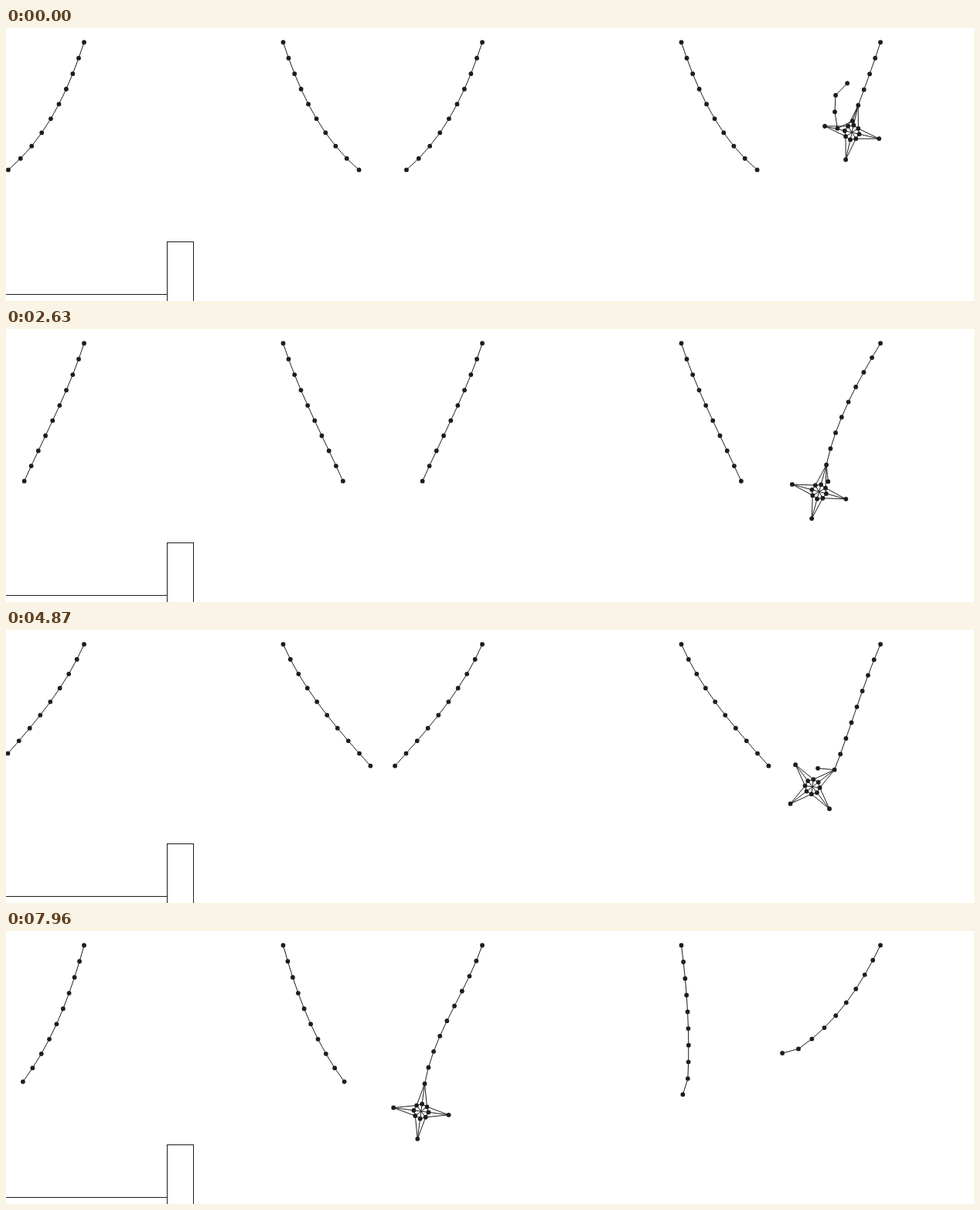
Recreate the animation shown at these times as an HTML page. Size 1252 by 353 pixels, loop 8000 ms.

```html
<!DOCTYPE html>
<html lang="en">
<head>
<meta charset="utf-8">
<title>Swinging star</title>
<style>
  html, body { margin: 0; width: 100%; height: 100%; overflow: hidden; background: #fff; }
  svg { display: block; }
  path { fill: none; stroke: #1f1c1d; }
</style>
</head>
<body>
<svg width="1252" height="353" viewBox="0 0 1252 353">
  <path d="M0 344.5H208.5M208.5 354V276.5H242.5V354" shape-rendering="crispEdges"/>
  <path id="lines" stroke-width="1"/>
  <path id="dots" stroke-width="5.8" stroke-linecap="round"/>
</svg>
<script>
const LOOP = 8, LINKS = 9, LINK = 21.6, ARM = 36, HUB = 9.6, TOP = 18.5;
const range = n => Array.from({ length: n }, (_, i) => i);
const anchors = range(5).map(i => 101 + 257.5 * i);
const rad = deg => deg * Math.PI / 180;
const lerp = (a, b, u) => a + (b - a) * u;
const clamp01 = u => Math.min(1, Math.max(0, u));

// Smooth curve through keys [time, ...values].
function sample(keys, t) {
  const last = keys.length - 1;
  let k = 0;
  while (k < last - 1 && t > keys[k + 1][0]) k++;
  const a = keys[k], b = keys[k + 1];
  const before = keys[Math.max(0, k - 1)], after = keys[Math.min(last, k + 2)];
  const span = b[0] - a[0], u = clamp01((t - a[0]) / span);
  const u2 = u * u, u3 = u2 * u;
  return a.slice(1).map((v, j) => {
    const i = j + 1;
    const m0 = (b[i] - before[i]) / (b[0] - before[0]) * span;
    const m1 = (after[i] - v) / (after[0] - a[0]) * span;
    return (2 * u3 - 3 * u2 + 1) * v + (u3 - 2 * u2 + u) * m0
      + (3 * u2 - 2 * u3) * b[i] + (u3 - u2) * m1;
  });
}

// A rope bends along a parabola of link angles; only the last link is free.
function bend(root, mid, end, i) {
  const u = i / 3.5, curve = (end - 2 * mid + root) / 2;
  return root + (mid - root - curve) * u + curve * u * u;
}
const rope = keys => keys.map(([t, root, mid, end, tail = bend(root, mid, end, 8)]) =>
  [t, root, mid, end, tail]);

// Keys: time, angles at root, middle and end, optional tail; right is positive.
const idle = rope([
  [0, -19, -27.5, -42],
  [1.92, -12, -18, -32],
  [3.31, 17.5, 24, 34.5],
  [4.87, -25.5, -36, -41.2],
  [6, 17.5, 24, 36],
  [7.1, -7, -10, -15.2],
  [7.96, -16, -22, -31.7],
  ...range(6).flatMap(i => {
    const side = i % 2 ? -1 : 1;
    return [
      [0.34 + 1.326 * i, -2 * side, 0, 4 * side],
      [1.01 + 1.325 * i, 27 * side, 37 * side, 42 * side]
    ];
  })
].sort((a, b) => a[0] - b[0]));

const rightRope = rope([
  [0, -18.4, -20.3, -18],
  [1, 33, 38, 38],
  [1.6, -4, 0, 3, 60],
  [1.92, -38, -28, -32, 116.6],
  [2.3, -38, -36, -32, 20],
  [3.31, -8, 6.5, 28, 13],
  [3.75, 28, 36, 42],
  [4.12, 20, 22, 26],
  [4.87, -22.5, -19, -20.5, -95],
  [5.3, -32, -36, -40],
  [6, 6.5, 3, -5.4, 6.7],
  [6.62, 30, 38, 44],
  [7.1, 12, 19.5, 17],
  [7.96, -27, -37, -53.5, -75]
]);
const fourthRope = rope([
  [5.5, 2, 0, -6],
  [6, -29, -32, -36.6, -95],
  [6.25, -32, -33, -36],
  [7.1, 25, 26, 33, 58],
  [7.32, 27, 31, 40],
  [7.96, 7, 3, -2, -17.5]
]);
const middleRope = rope([
  [6.6, 2, 0, -3],
  [7.1, -22, -23.5, -33, -32],
  [7.5, -31, -34, -31],
  [7.96, -21, -27, -18, -13]
]);

const idlePose = (index, t) => sample(idle, t).map(v => index % 2 ? -v : v);
const afterGrab = (index, grab, keys) => ({
  grab, keys: [[grab, ...idlePose(index, grab)], ...keys]
});
const driven = {
  2: afterGrab(2, 6.1, middleRope),
  3: afterGrab(3, 5, fourthRope),
  4: { grab: 0, keys: rightRope }
};
const coil = { 5: -44, 6: -152, 7: -165, 8: -208 };

function ropePoints(index, t) {
  const own = driven[index];
  const [root, mid, end, tail] =
    own && t >= own.grab ? sample(own.keys, t) : idlePose(index, t);
  const points = [[anchors[index], TOP]];
  for (let i = 0; i < LINKS; i++) {
    let angle = i < 8 ? bend(root, mid, end, i) : tail;
    if (index === 4) angle += (coil[i] || 0) * clamp01(1 - t);
    const [x, y] = points[i];
    points.push([x + LINK * Math.sin(rad(angle)), y + LINK * Math.cos(rad(angle))]);
  }
  return points;
}

// Star rotation in degrees; each new grip uses the next arm.
const starTurn = [
  [0, 13], [0.9, -42], [1.6, -46], [1.92, -57.5], [2.3, 15], [2.85, 2],
  [3.31, -53.2], [3.75, -50], [4.12, -35], [4.87, 52.3], [5.5, 98],
  [6, 131], [6.6, 182], [7.1, 193.8], [7.5, 208], [7.96, 187.4]
];
const grips = [
  { rope: 4, node: t => lerp(4, 8, clamp01(t - 0.25)), arm: 0 },
  { rope: 3, node: () => 8, arm: 1, from: 4.89, to: 5 },
  { rope: 2, node: () => 9, arm: 2, from: 6.01, to: 6.1 }
];

function starCentre(ropes, turn, t) {
  let centre;
  for (const g of grips) {
    if (g.from > t) break;
    const points = ropes[g.rope], n = g.node(t), k = Math.min(LINKS - 1, Math.floor(n));
    const a = rad(turn - 90 * g.arm);
    const x = lerp(points[k][0], points[k + 1][0], n - k) - ARM * Math.sin(a);
    const y = lerp(points[k][1], points[k + 1][1], n - k) + ARM * Math.cos(a);
    const u = centre ? clamp01((t - g.from) / (g.to - g.from)) : 1;
    centre = u < 1 ? [lerp(centre[0], x, u), lerp(centre[1], y, u)] : [x, y];
  }
  return centre;
}

const at = p => p[0].toFixed(2) + ' ' + p[1].toFixed(2);
const polyline = points => 'M' + points.map(at).join('L');
const linesPath = document.getElementById('lines');
const dotsPath = document.getElementById('dots');

function draw(t) {
  const ropes = anchors.map((_, i) => ropePoints(i, t));
  const [turn] = sample(starTurn, t);
  const [cx, cy] = starCentre(ropes, turn, t);
  const around = (r, deg) =>
    [cx + r * Math.sin(rad(turn + deg)), cy - r * Math.cos(rad(turn + deg))];
  const hub = range(8).map(i => around(HUB, i * 45));
  const tips = range(4).map(i => around(ARM, i * 90));

  const lines = ropes.map(polyline);
  lines.push(polyline(hub) + 'Z');
  tips.forEach((tip, k) => {
    lines.push(polyline([hub[k], hub[k + 4]]));
    for (const side of [7, 0, 1]) lines.push(polyline([tip, hub[(2 * k + side) % 8]]));
  });
  linesPath.setAttribute('d', lines.join(''));
  dotsPath.setAttribute('d',
    [...ropes.flat(), ...hub, ...tips].map(p => 'M' + at(p) + 'h.01').join(''));
}

const start = performance.now();
function tick() {
  draw((performance.now() - start) / 1000 % LOOP);
  requestAnimationFrame(tick);
}
tick();
</script>
</body>
</html>
```
